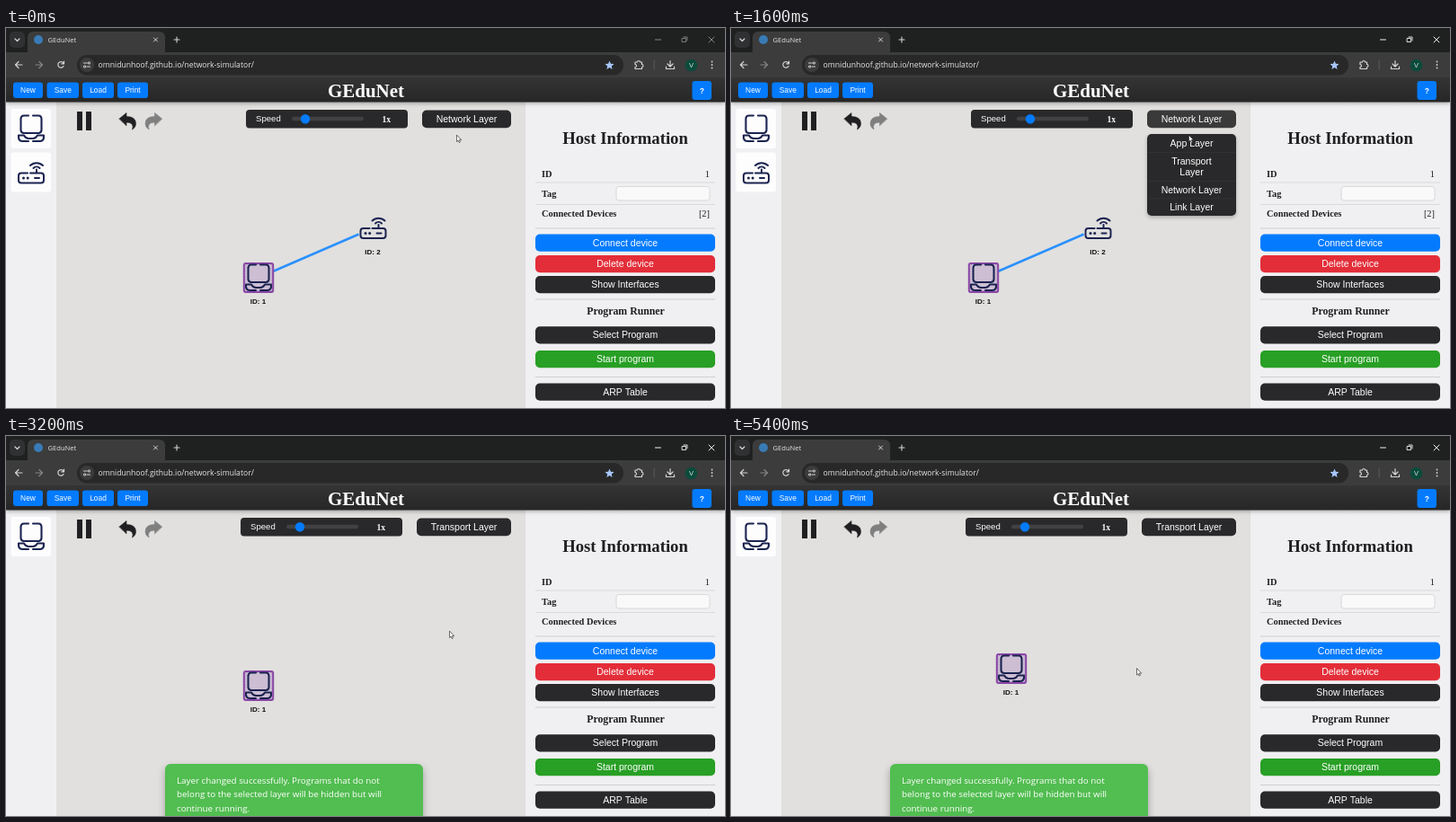
These frames come from a looping animation (800 px wide and 423 px high, 5.5 s). An HTML page with a canvas:

```html
<!DOCTYPE html>
<html lang="en">
<head>
<meta charset="utf-8">
<title>GEduNet</title>
<style>
html, body { margin: 0; width: 100%; height: 100%; overflow: hidden; background: #e1e0de; }
canvas { display: block; width: 800px; height: 423px; }
</style>
</head>
<body>
<canvas id="stage"></canvas>
<script>
const W = 800, H = 423, LOOP = 5500, STEP = 100;
const canvas = document.getElementById('stage');
const ratio = window.devicePixelRatio || 1;
canvas.width = W * ratio;
canvas.height = H * ratio;
const c = canvas.getContext('2d');

const SANS = '"Liberation Sans", Arial, sans-serif';
const SERIF = '"Liberation Serif", "Times New Roman", serif';
const UI = '"Open Sans", "Noto Sans", sans-serif';
const BLUE = '#047bfe', DARK = '#29292b', HOVER = '#3a3a3b', NAVY = '#1b2350';

// Key poses: [time, x, y]
const CURSOR = [
  [0, 501.5, 119.5], [400, 499, 106], [600, 498, 102], [1400, 498, 102],
  [1600, 509.5, 119.5], [1800, 511, 150], [2600, 511.5, 152], [2800, 511, 153],
  [3200, 493.5, 217.5], [3800, 282.5, 277.5], [4300, 310, 265], [4700, 313.5, 258.5],
  [4900, 313.5, 258.5], [5400, 451.5, 259]
];
const HOST = [[3800, 281, 278], [4300, 308.5, 266.5], [4700, 312, 259]];

const TRANSPORT_INFO = [
  'The Transport Layer ensures end-to-end communication between applications on',
  'different devices. It provides essential services such as multiplexing, reliable data',
  'transfer, congestion control, and flow control. Protocols like TCP offer reliability',
  'through acknowledgments, retransmissions, and sequence numbers, while UDP',
  'provides a simpler, connectionless service with lower overhead. This layer plays a',
  'crucial role in ensuring data is transmitted efficiently and reliably across the network.'
];
const CHANGED_INFO = [
  'Layer changed successfully. Programs that do not',
  'belong to the selected layer will be hidden but will',
  'continue running.'
];

function poseAt(keys, t) {
  const next = keys.findIndex(k => k[0] > t);
  if (next === 0) return keys[0].slice(1);
  if (next < 0) return keys[keys.length - 1].slice(1);
  const a = keys[next - 1], b = keys[next];
  const u = (t - a[0]) / (b[0] - a[0]), e = u * u * (3 - 2 * u);
  return [a[1] + (b[1] - a[1]) * e, a[2] + (b[2] - a[2]) * e];
}

function rect(x, y, w, h, fill) {
  c.fillStyle = fill;
  c.fillRect(x, y, w, h);
}

function box(x, y, w, h, r, fill, stroke, width = 1) {
  c.beginPath();
  c.roundRect(x, y, w, h, r);
  if (fill) { c.fillStyle = fill; c.fill(); }
  if (stroke) { c.strokeStyle = stroke; c.lineWidth = width; c.stroke(); }
}

function disc(x, y, r, fill) {
  c.beginPath();
  c.arc(x, y, r, 0, Math.PI * 2);
  c.fillStyle = fill;
  c.fill();
}

function text(str, x, y, font, color, align = 'left') {
  c.font = font;
  c.fillStyle = color;
  c.textAlign = align;
  c.fillText(str, x, y);
}

function path(d, x, y, color, width, fill) {
  const shape = new Path2D(d);
  c.save();
  c.translate(x, y);
  c.lineCap = c.lineJoin = 'round';
  if (fill) { c.fillStyle = fill; c.fill(shape); }
  if (color) { c.strokeStyle = color; c.lineWidth = width; c.stroke(shape); }
  c.restore();
}

function withShadow(color, blur, dy, draw) {
  c.save();
  c.shadowColor = color;
  c.shadowBlur = blur * ratio;
  c.shadowOffsetY = dy * ratio;
  draw();
  c.restore();
}

function button(label, x, y, w, h, fill, color = '#fff') {
  box(x, y, w, h, 5, fill);
  text(label, x + w / 2, y + h / 2 + 3.6, `10.5px ${SANS}`, color, 'center');
}

function laptop(x, y) {
  path('M-3-14H-8Q-11.5-14-11.5-10.5V2Q-11.5 5.5-8 5.5H8Q11.5 5.5 11.5 2V-10.5Q11.5-14 8-14H2',
    x, y, NAVY, 2.1);
  path('M-9 8H-14Q-14.5 14.5-10 14.5H-3M2 14.5H10Q14.5 14.5 14 8H7Q5 11.5 2 11.5H-3Q-6 11.5-8 8',
    x, y, NAVY, 2.1);
}

function router(x, y) {
  path('M-4 0H-11Q-14 0-14 3V8Q-14 11-11 11H11Q14 11 14 8V3Q14 0 11 0H6V-4M0 11H4' +
    'M-1 0H6M2.5-5.5A5 5 0 0 1 9.5-5.5M-1-8.5A10 10 0 0 1 13-8.5M4 5.5H9', x, y, NAVY, 2);
  disc(x - 8.5, y + 5.5, 1.5, NAVY);
  disc(x - 3.8, y + 5.5, 1.5, NAVY);
}

function browser(active) {
  const icon = '#d4d4d4', gray = '#858585', win = active ? '#f2f2f2' : '#858585';
  rect(0, 0, W, 27, '#1f2020');
  box(4, 4, 17, 18, 5, '#303132');
  path('M-2.5-1L0 1.5L2.5-1', 12.5, 13, icon, 1.2);
  box(24, 4, 153, 28, 6, '#3c3c3c');
  disc(36, 13, 5, '#397bb5');
  text('GEduNet', 46.5, 16.3, `7.6px ${UI}`, '#e4e4e4');
  path('M-2-2L2 2M2-2L-2 2', 166.5, 13, icon, 1);
  path('M-3 0H3M0-3V3', 190, 13, icon, 1.1);
  path('M-3 0H3', 725.5, 13, win, 1);
  path('M-2.5-1.5H1.5V2.5H-2.5ZM-1-3H3V1', 755, 13, win, 0.9);
  path('M-3-3L3 3M3-3L-3 3', 785, 13, win, 1);

  rect(0, 27, W, 28, '#3c3c3c');
  path('M4 0H-3.5M0-3.5L-3.5 0L0 3.5', 14, 41, icon, 1.2);
  path('M-4 0H3.5M0-3.5L3.5 0L0 3.5', 37, 41, gray, 1.2);
  path('M3 1.5A3.3 3.3 0 1 1 2.5-2.5M3.5-4V-1.2H.7', 61, 41, icon, 1.2);
  box(79, 30, 608, 22.5, 11, '#282828');
  disc(90, 41, 8, '#3c3c3c');
  path('M-3.5-2H0M3.5 2H0M-1.5 2H-2M1.5-2H2', 90, 41, icon, 1.1);
  path('M1.2-2A1.2 1.2 0 1 0 3.6-2A1.2 1.2 0 1 0 1.2-2M-3.6 2A1.2 1.2 0 1 0-1.2 2A1.2 1.2 0 1 0-3.6 2',
    90, 41, icon, 0.9);
  text('omnidunhoof.github.io/network-simulator/', 102.5, 44.3, `8.62px ${UI}`, '#e6e6e6');
  path('M0-5L1.4-1.7L5-1.4L2.3 1L3.1 4.5L0 2.6L-3.1 4.5L-2.3 1L-5-1.4L-1.4-1.7Z',
    671.5, 41.5, null, 0, '#a8c7fa');
  path('M-4-3H-1.5A1.5 1.5 0 0 1 1.5-3H3.5V-.5A1.5 1.5 0 0 1 3.5 2.5V4.5H-4V2.5A1.5 1.5 0 0 0-4-.5Z',
    704, 41, icon, 1.2);
  rect(720.7, 36, 1, 10, '#5c5c5c');
  path('M0-4.5V2M-3-1L0 2L3-1M-4.5 2V4.5H4.5V2', 739, 41, icon, 1.2);
  disc(762.5, 41.5, 6.8, '#0b4b3c');
  text('V', 762.5, 44.2, `7.5px ${SANS}`, '#d8e5df', 'center');
  [-3.5, 0, 3.5].forEach(dy => disc(785.5, 41 + dy, 0.9, icon));
}

function header() {
  const shade = c.createLinearGradient(0, 55, 0, 83);
  shade.addColorStop(0, '#343434');
  shade.addColorStop(1, '#262626');
  withShadow('rgba(0,0,0,.35)', 5, 1, () => rect(0, 54.5, W, 28, shade));
  [['New', 8, 33], ['Save', 45.5, 35.5], ['Load', 85, 35], ['Print', 124, 34]].forEach(([label, x, w]) => {
    box(x, 60.5, w, 17.5, 3, BLUE);
    text(label, x + w / 2, 72.3, `8.4px ${SANS}`, '#fff', 'center');
  });
  text('GEduNet', 400.5, 77, `bold 21px ${SERIF}`, '#fff', 'center');
  box(763.5, 59, 21.5, 21, 3, BLUE);
  text('?', 774.3, 72.5, `bold 8.4px ${SANS}`, '#fff', 'center');
}

function sidePanel(changed) {
  const ink = '#1f1f21', bold = `bold 10.4px ${SERIF}`, plain = `10.4px ${SERIF}`;
  rect(578, 82, 222, 341, '#f0eff1');
  text('Host Information', 689, 129, `bold 18.7px ${SERIF}`, ink, 'center');
  text('ID', 596, 166, bold, ink);
  text('1', 783, 166, plain, ink, 'right');
  text('Tag', 596, 188, bold, ink);
  text('Connected Devices', 596, 210, bold, ink);
  if (!changed) text('[2]', 783, 210, plain, ink, 'right');
  [171.5, 196].forEach(y => rect(589, y, 200, 1, '#dadadc'));
  [222.5, 301.5, 388].forEach(y => rect(589, y, 200, 1, '#cfcfd1'));
  box(679, 176.5, 104, 15.5, 3, '#f9f9f9', '#d8d8da');
  text('Program Runner', 689.5, 319, `bold 11.8px ${SERIF}`, ink, 'center');
  [
    ['Connect device', 229.5, BLUE], ['Delete device', 253, '#e32e39'],
    ['Show Interfaces', 276, DARK], ['Select Program', 332.2, DARK],
    ['Start program', 359, '#289f25'], ['ARP Table', 395.5, DARK]
  ].forEach(([label, y, fill]) => button(label, 589, y, 200, 19.3, fill));
}

function leftPanel(changed) {
  rect(0, 82, 56, 341, '#f0eff2');
  box(5.5, 90, 44.5, 44, 3, '#fdfdfd');
  laptop(28, 111.5);
  if (changed) return;
  box(5.5, 138.5, 44.5, 44, 3, '#fdfdfd');
  router(28, 161.5);
}

function controls(changed, hovered, leaving) {
  rect(79, 93, 6, 21, '#202022');
  rect(89, 93, 6, 21, '#202022');
  const reply = 'M-9.5-2.5L-1.5-9V-5Q9-5 9 3Q9 7 5 9.5Q7.5 1.5-1.5 1.5V5Z';
  path(reply, 135.5, 103.5, '#202022', 0.6, '#202022');
  c.save();
  c.translate(164, 103.5);
  c.scale(-1, 1);
  path(reply, 0, 0, '#7f7f80', 0.6, '#7f7f80');
  c.restore();

  const dx = changed ? -6 : 0;
  box(267 + dx, 91, 180, 20.5, 4, DARK);
  text('Speed', 278 + dx, 104.2, `9.6px ${SANS}`, '#fff');
  box(318 + dx, 98.7, 80, 4.6, 2.3, '#414143');
  disc(333 + dx, 101.2, 5.2, BLUE);
  text('1x', 418.5 + dx, 104.5, `bold 9.6px ${SERIF}`, '#fff');

  const label = changed ? 'Transport Layer' : 'Network Layer';
  if (hovered) button(label, 461.7, 91.2, 101.6, 20.3, HOVER, '#2583e8');
  else button(label, 463 + dx, 91.5, 99 - dx, 19.8, leaving ? HOVER : DARK);
}

function menu(transportHovered) {
  const font = `10.5px ${SANS}`, mid = 512.5;
  withShadow('rgba(0,0,0,.25)', 4, 2, () => box(463, 118, 99, 91, 5, DARK));
  [138, 170, 189.5].forEach(y => rect(463, y, 99, 0.7, '#353537'));
  if (transportHovered) box(461.7, 137.7, 101.6, 32.6, 2, HOVER);
  const color = transportHovered ? '#2583e8' : '#fff';
  text('App Layer', mid, 131.5, font, '#fff', 'center');
  text('Transport', mid, 151.5, font, color, 'center');
  text('Layer', mid, 163.5, font, color, 'center');
  text('Network Layer', mid, 183.5, font, '#fff', 'center');
  text('Link Layer', mid, 203, font, '#fff', 'center');
}

function network(t, changed) {
  const [x, y] = poseAt(HOST, t), label = `bold 8px ${SANS}`;
  if (!changed) {
    path('M298 270.6L391.5 230', 0, 0, '#2c91fd', 2.7);
    router(408.5, 223);
    text('ID: 2', 408, 251.5, label, '#111', 'center');
  }
  box(x - 16.2, y - 16, 32.4, 32, 2, 'rgba(142,90,176,.25)', '#8a47a6', 2);
  c.setLineDash([1.5, 1.5]);
  box(x - 15, y - 14.8, 30, 29.6, 1, null, 'rgba(138,71,166,.6)', 0.8);
  c.setLineDash([]);
  laptop(x, y - 0.5);
  text('ID: 1', x - 0.5, y + 29.3, label, '#111', 'center');
}

function popup(lines, x, y, w, h, textX, baseline, leading, fill) {
  withShadow('rgba(0,0,0,.3)', 9, 4, () => box(x, y, w, h, 6, fill));
  lines.forEach((line, i) => text(line, textX, baseline + i * leading, `9.82px ${UI}`, '#fff'));
}

function pointer(t, hand) {
  const [x, y] = poseAt(CURSOR, t);
  if (hand) {
    path('M0 .8Q1-.4 1.8 .8V4L5 4.8Q5.8 5.2 5.5 6.5L4.8 9H.8L-1.8 6Q-2-.2 0 5.5Z',
      x, y, '#222', 0.7, '#fff');
  } else {
    path('M0 0V7L1.6 5.6L2.7 8L3.9 7.5L2.8 5.1H4.8Z', x, y, '#333', 0.7, '#fff');
  }
}

function draw(t) {
  const changed = t >= 2900;
  const hovered = t >= 400 && t < 1500;
  const overTransport = t >= 1800 && !changed;
  const dragging = t >= 3800 && t < 4900;
  c.setTransform(ratio, 0, 0, ratio, 0, 0);
  rect(0, 0, W, H, '#e1e0de');
  network(t, changed);
  leftPanel(changed);
  sidePanel(changed);
  header();
  browser(t >= 800);
  controls(changed, hovered, t >= 1500 && t < 1700);
  if (t >= 1000 && !changed) menu(overTransport);
  if (t >= 500 && t < 1200) {
    popup(['Select a Layer.'], 271, 329, 98, 45.5, 287.5, 355.3, 0, 'rgba(51,51,51,.87)');
  }
  if (overTransport) {
    popup(TRANSPORT_INFO, 108.5, 282, 423.5, 139, 125, 308.6, 18.73, 'rgba(51,51,51,.87)');
  }
  if (changed) {
    const rise = Math.max(0, 1 - (t - 2900) / 200) * 30;
    popup(CHANGED_INFO, 177, 365 + rise, 287, 80, 190, 386.5 + rise, 15.6, '#52bd51');
  }
  pointer(t, hovered || dragging);
}

const start = performance.now();
function tick() {
  const t = (performance.now() - start) % LOOP;
  draw(Math.floor(t / STEP) * STEP);
  requestAnimationFrame(tick);
}
tick();
</script>
</body>
</html>
```
